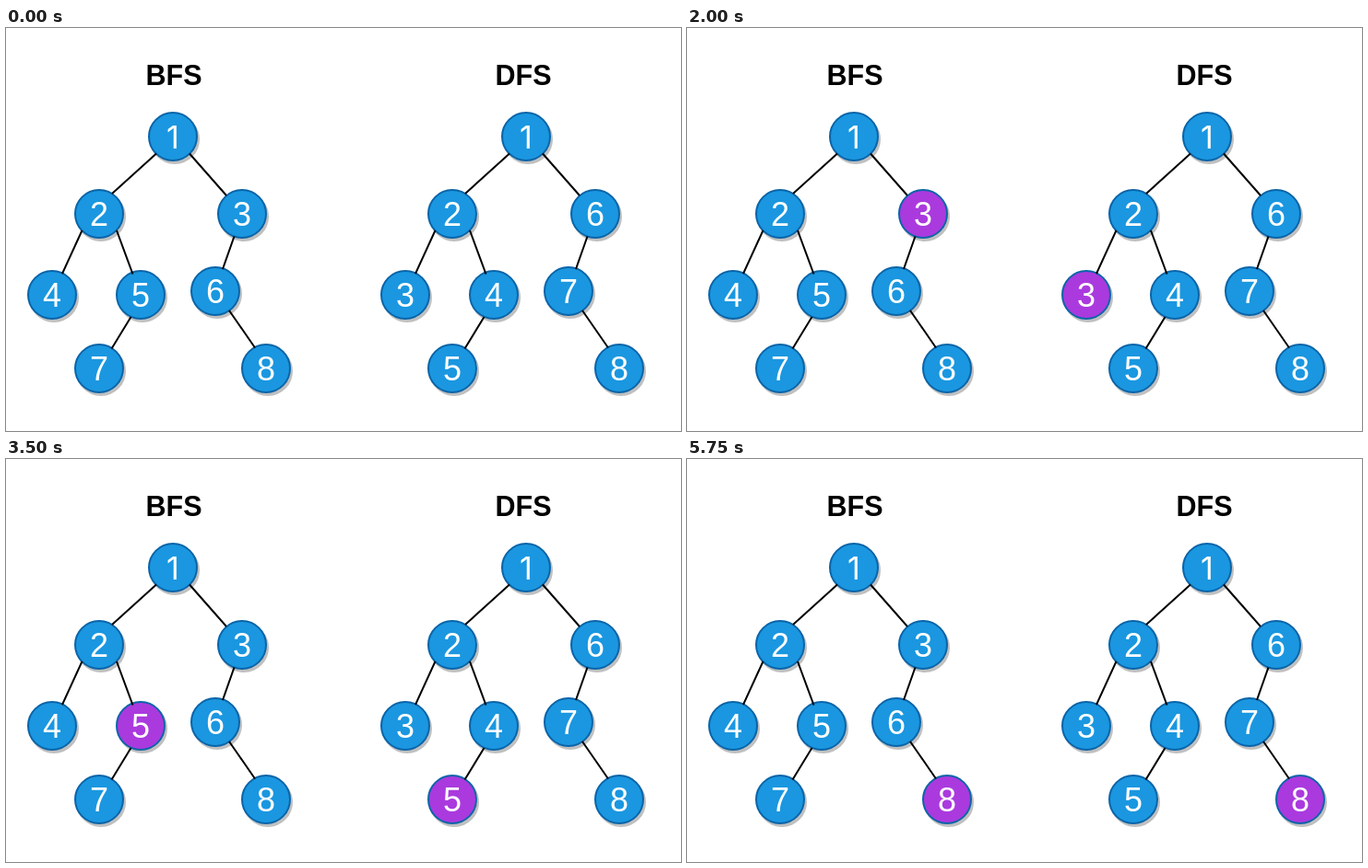
Animation, 732 px wide and 438 px high, one loop 7000 ms. Source, as an HTML page:

```html
<!DOCTYPE html>
<html lang="en">
<head>
<meta charset="utf-8">
<title>BFS and DFS</title>
<style>
  html, body { margin: 0; width: 100%; height: 100%; overflow: hidden; background: #fff; }
  svg { display: block; width: 732px; height: 438px; }
  text { text-anchor: middle; font-family: "Liberation Sans", Arial, sans-serif; }
  .title { font-size: 30.5px; font-weight: bold; fill: #000; }
  .label { font-size: 36px; fill: #fff; }
  .one { font: 34px Inter, sans-serif; }
  .shadow { fill: #c0c0c0; stroke: #c0c0c0; stroke-width: 2; }
  .edges { fill: none; stroke: #000; stroke-width: 2; }
  .disc {
    fill: #1a97e0; stroke: #0a64a8; stroke-width: 2;
    animation: visit 7s step-end calc(500ms + (var(--n) - 1) * 750ms) infinite;
  }
  .disc.last { animation-name: visit-last; }
  @keyframes visit {
    0% { fill: #aa3ade; }
    10.7143%, 100% { fill: #1a97e0; }
  }
  @keyframes visit-last {
    0% { fill: #aa3ade; }
    17.8571%, 100% { fill: #1a97e0; }
  }
</style>
</head>
<body>
<svg id="stage" viewBox="0 0 732 438" xmlns="http://www.w3.org/2000/svg">
  <text class="title" x="182" y="62">BFS</text>
  <text class="title" x="561" y="62">DFS</text>
</svg>
<script>
  const spots = [[181, 118], [101, 202], [256, 202], [50, 290], [146, 290], [227, 286], [101, 370], [282, 370]];
  const edges = "M163 136.5L115 180M199 136.5L239 182M82.5 220L61 267M120 220L137.5 267.5" +
    "M135.5 314L114.5 348.5M247.5 226.5L235 262M242 307L270 347.5";

  function node([x, y], n) {
    return `<circle class="shadow" cx="${x + 2}" cy="${y + 3}" r="26"/>
      <circle class="disc${n === 8 ? " last" : ""}" style="--n:${n}" cx="${x}" cy="${y}" r="26"/>
      <text class="label${n === 1 ? " one" : ""}" x="${x}" y="${y + 12.5}">${n}</text>`;
  }

  function tree(shift, order) {
    const nodes = spots.map((p, i) => node(p, order[i])).join("");
    return `<g transform="translate(${shift})">${nodes}<path class="edges" d="${edges}"/></g>`;
  }

  document.getElementById("stage").insertAdjacentHTML("beforeend",
    tree(0, [1, 2, 3, 4, 5, 6, 7, 8]) + tree(383, [1, 2, 6, 3, 4, 7, 5, 8]));
</script>
</body>
</html>
```
